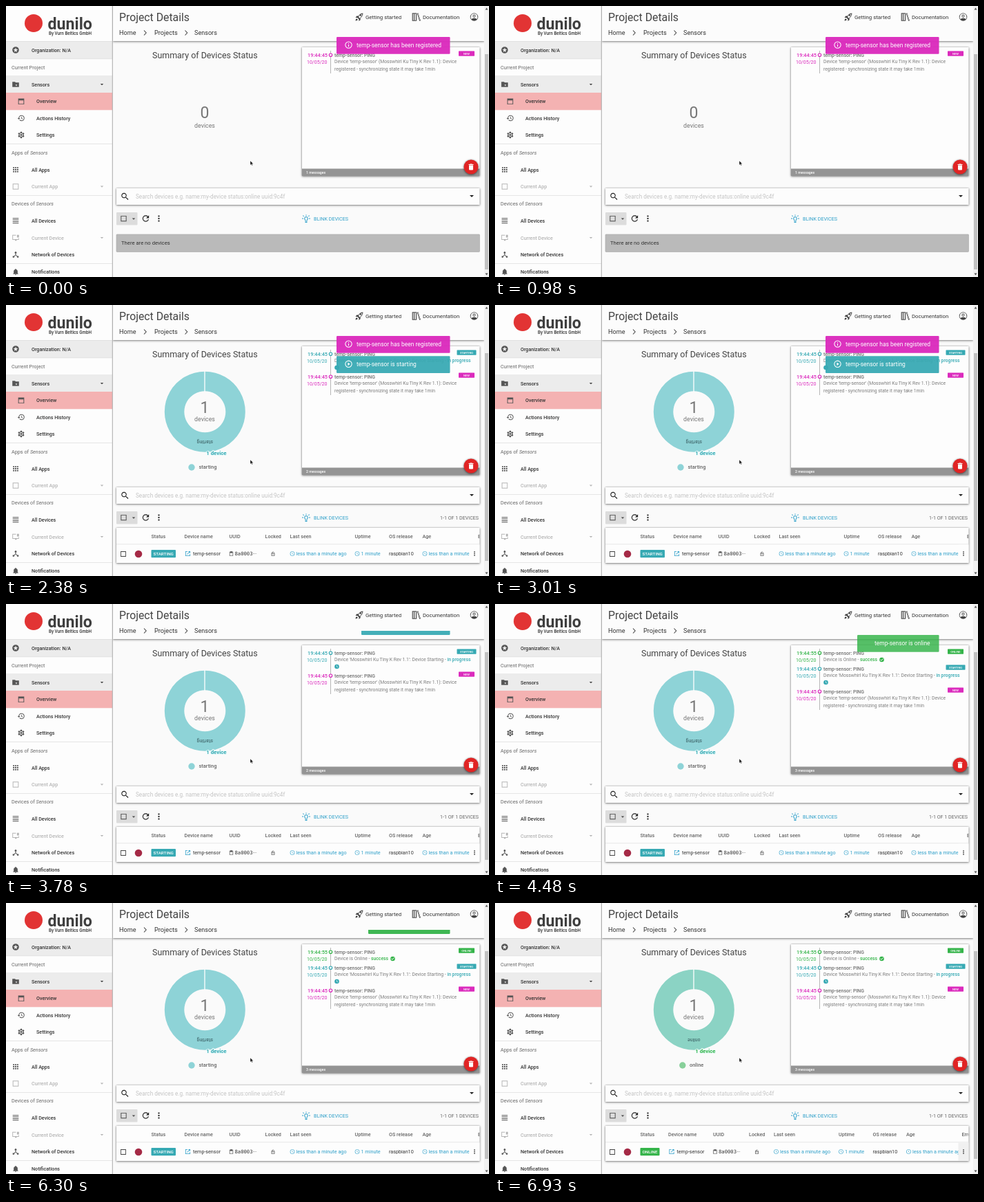
Animation of 700x394 px, one loop 7000 ms. Source, as an HTML page:

```html
<!DOCTYPE html>
<html lang="en">
<head>
<meta charset="utf-8">
<title>Project Details</title>
<style>
html, body { margin: 0; width: 100%; height: 100%; overflow: hidden; background: #fafafa; }
svg { display: block; width: 100vw; height: 100vh; font-family: Roboto, sans-serif; }
.m { font-weight: 500; }
.b { font-weight: 700; }
.shadow { filter: drop-shadow(0 0 .8px rgba(0, 0, 0, .3)) drop-shadow(0 1px 1.5px rgba(0, 0, 0, .4)); }
</style>
</head>
<body>
<svg id="stage" viewBox="0 0 700 394"></svg>
<script>
const LOOP = 7000;
const STARTING_AT = 1190, FIRST_TOAST_OUT = 3010, SECOND_TOAST_OUT = 3640;
const ONLINE_LOG_AT = 4340, ONLINE_TOAST_OUT = 6160, ONLINE_AT = 6720;
const TEAL = '#36a9b3', MAGENTA = '#db2bbd', GREEN = '#35b44a', BLUE = '#2d9fc9';

const PATHS = {
  star: 'M12 2a10 10 0 1 0 0 20 10 10 0 0 0 0-20zm4.24 16L12 15.45 7.77 18l1.12-4.81-3.73-3.23 4.92-.42L12 5l1.92 4.53 4.92.42-3.73 3.23z',
  folder: 'M10 4H2v16h20V6H12zm6 13-2-1.5-2 1.5.8-2.4-2-1.5h2.4L14 11l.8 2.1h2.4l-2 1.5z',
  win: 'M3 3v18h18V3zm2 6h14v10H5z',
  history: 'M13 3a9 9 0 0 0-9 9H1l4 4 4-4H6a7 7 0 1 1 2.05 4.95l-1.42 1.42A9 9 0 1 0 13 3zm-1 5v5l4.3 2.5.7-1.2-3.5-2.1V8z',
  apps: 'M4 8h4V4H4zm6 12h4v-4h-4zm-6 0h4v-4H4zm0-6h4v-4H4zm6 0h4v-4h-4zm6-10v4h4V4zm-6 4h4V4h-4zm6 6h4v-4h-4zm0 6h4v-4h-4z',
  list: 'M3 4h18v2H3zm0 5h18v2H3zm0 5h18v2H3zm0 5h18v2H3z',
  box: 'M3 3v18h18V3zm2 2h14v14H5z',
  screen: 'M2 3v15h8v3h5v-3h7v-5h-2v3H4V5h9V3zm14 0h6v8h-6z',
  hub: 'M17 16l-4-4V8.82a3 3 0 1 0-2 0V12l-4 4H3v5h5v-3l4-4.2 4 4.2v3h5v-5z',
  bell: 'M12 22a2 2 0 0 0 2-2h-4a2 2 0 0 0 2 2zm6-6v-5c0-3-1.6-5.6-4.5-6.3V4a1.5 1.5 0 0 0-3 0v.7C7.6 5.4 6 8 6 11v5l-2 2v1h16v-1z',
  gear: 'M10 2h4l.6 3 2 1.1 2.9-1 2 3.5-2.3 2v2.6l2.3 2-2 3.5-2.9-1-2 1.1-.6 3h-4l-.6-3-2-1.1-2.9 1-2-3.5 2.3-2v-2.6l-2.3-2 2-3.5 2.9 1 2-1.1zm2 5a5 5 0 1 0 0 10 5 5 0 0 0 0-10zm0 2a3 3 0 1 1 0 6 3 3 0 0 1 0-6z',
  caret: 'M6 9l6 6 6-6z',
  search: 'M15.5 14h-.8l-.3-.3a6.5 6.5 0 1 0-.7.7l.3.3v.8l5 5 1.5-1.5zm-6 0a4.5 4.5 0 1 1 0-9 4.5 4.5 0 0 1 0 9z',
  refresh: 'M17.65 6.35A8 8 0 1 0 19.73 14h-2.08A6 6 0 1 1 12 6c1.66 0 3.14.69 4.22 1.78L13 11h7V4z',
  dots: 'M10 3h4v4h-4zm0 7h4v4h-4zm0 7h4v4h-4z',
  trash: 'M6 19a2 2 0 0 0 2 2h8a2 2 0 0 0 2-2V7H6zM19 4h-3.5l-1-1h-5l-1 1H5v2h14z',
  clock: 'M12 2a10 10 0 1 0 0 20 10 10 0 0 0 0-20zm0 2a8 8 0 1 1 0 16 8 8 0 0 1 0-16zm-1 3v6l5 3 .8-1.3-4.2-2.5V7z',
  solidClock: 'M12 2a10 10 0 1 0 0 20 10 10 0 0 0 0-20zm-1 4h2v6l4 3-1 1.6-5-3.6z',
  check: 'M12 2a10 10 0 1 0 0 20 10 10 0 0 0 0-20zm-2 15-5-5 1.4-1.4L10 14.2l7.6-7.6L19 8z',
  info: 'M12 2a10 10 0 1 0 0 20 10 10 0 0 0 0-20zm0 2a8 8 0 1 1 0 16 8 8 0 0 1 0-16zm-1 3h2v2h-2zm0 4h2v6h-2z',
  play: 'M12 2a10 10 0 1 0 0 20 10 10 0 0 0 0-20zm0 2a8 8 0 1 1 0 16 8 8 0 0 1 0-16zm-2 3.5v9l6-4.5z',
  user: 'M12 2a10 10 0 1 0 0 20 10 10 0 0 0 0-20zm0 1.5a8.5 8.5 0 0 1 6.5 14c-3-3.2-10-3.2-13 0A8.5 8.5 0 0 1 12 3.5zM12 6a3.6 3.6 0 1 0 0 7.2A3.6 3.6 0 0 0 12 6zm0 1.5a2.1 2.1 0 1 1 0 4.2 2.1 2.1 0 0 1 0-4.2z',
  open: 'M3 3v18h18v-8h-2v6H5V5h6V3zm11 0v2h3.6l-9 9 1.4 1.4 9-9V10h2V3z',
  clip: 'M4 4v18h16V4h-4V2H8v2zm2 2h2v3h8V6h2v14H6z',
  lock: 'M5 9v13h14V9h-9V6a2.5 2.5 0 0 1 5 0h2A5 5 0 0 0 8 6v3zm2 2h10v9H7zm4 3h2v3h-2z',
  rocket: 'M22 2c-6 0-9 3-12 7H5l-3 5h5l4 4v5l4-3v-5c4-3 7-7 7-13zm-2 2c0 4-2 7-7 11l-3-3c3-5 6-7 10-8zm-4 2a2 2 0 1 0 0 4 2 2 0 0 0 0-4zM5 16c-2 1-3 3-3 6 3 0 5-1 6-3z',
  books: 'M2 2v20h11V2zm2 2h2v16H4zm4 0h3v16H8zm6-1 6 19 3-1-6-19zm2 1 1-.3 4.6 15.4-1 .3z',
  bulb: 'M12 5a6 6 0 0 0-3 11v4h6v-4a6 6 0 0 0-3-11zm0 2a4 4 0 0 1 1.5 7.5V18h-3v-3.5A4 4 0 0 1 12 7zM11 0h2v3h-2zM2 3l1.5-1.5 2.5 2.5-1.5 1.5zm18.5-1.5L22 3l-2.5 2.5L18 4zM0 10h4v2H0zm20 0h4v2h-4zM9 21h6v2H9z'
};

const text = (s, x, y, size, fill = '#333', attrs = '') =>
  `<text x="${x}" y="${y}" font-size="${size}" fill="${fill}" ${attrs}>${s}</text>`;
const rect = (x, y, w, h, fill, attrs = '') =>
  `<rect x="${x}" y="${y}" width="${w}" height="${h}" fill="${fill}" ${attrs}/>`;
const disc = (x, y, r, fill, attrs = '') =>
  `<circle cx="${x}" cy="${y}" r="${r}" fill="${fill}" ${attrs}/>`;
const icon = (name, x, y, size = 11, fill = '#444') =>
  `<path d="${PATHS[name]}" fill="${fill}" fill-rule="evenodd" transform="translate(${x - size / 2} ${y - size / 2}) scale(${size / 24})"/>`;
const M = 'class="m"', MID = 'text-anchor="middle"', END = 'text-anchor="end"';

function sidebar() {
  const row = (name, label, y, indent, fill = '#333') =>
    icon(name, indent ? 22 : 14, y, 11.5, fill === '#333' ? '#555' : fill) +
    text(label, indent ? 44 : 37, y + 2.6, 7.15, fill, M);
  const heading = (label, y) => text(label, 8, y + 2.6, 7.25, '#666');
  const line = y => rect(0, y, 154, .7, '#ddd');
  const dim = '#b5b5b5';
  return rect(0, 0, 154, 394, '#fdfdfd') +
    disc(40, 25, 13, '#e23434') +
    text('dunilo', 60.5, 33.5, 23.2, '#3f3f3f', 'class="b"') +
    text('By Vurn Beltics GmbH', 62, 41.5, 6.3, '#333', M) +
    rect(0, 51, 154, 26, '#ececec') + line(51) + line(76.5) +
    row('star', 'Organization: N/A', 64) + heading('Current Project', 89) +
    rect(0, 101, 154, 25, '#ececec') +
    row('folder', 'Sensors', 114) + icon('caret', 139, 114, 9) +
    rect(0, 126, 154, 25.3, '#f4b2b2') +
    row('win', 'Overview', 138.8, 1) + row('history', 'Actions History', 163, 1) + row('gear', 'Settings', 187.5, 1) +
    line(200) + heading('Apps of <tspan font-style="italic">Sensors</tspan>', 213) +
    row('apps', 'All Apps', 238) + row('box', 'Current App', 262.5, 0, dim) + icon('caret', 139, 262.5, 9, dim) +
    line(275) + heading('Devices of <tspan font-style="italic">Sensors</tspan>', 287.5) +
    row('list', 'All Devices', 312) + row('screen', 'Current Device', 337, 0, dim) + icon('caret', 139, 337, 9, dim) +
    row('hub', 'Network of Devices', 361.5) + line(374) + row('bell', 'Notifications', 386.5) +
    rect(153.8, 0, 1, 394, '#aaa');
}

function header() {
  const chevron = x => `<path d="M${x} 35.5l3.2 3.5-3.2 3.5" fill="none" stroke="#444" stroke-width="1.1"/>`;
  return rect(155, 0, 538, 51, '#fcfcfc', 'class="shadow"') +
    text('Project Details', 164, 21.5, 15.8, '#444') +
    text('Home', 164, 42, 9.1) + chevron(200) + text('Projects', 215, 42, 9.2) + chevron(259.5) + text('Sensors', 273, 42, 9.1) +
    icon('rocket', 512, 16, 13) + text('Getting started', 521, 19, 7.85) +
    icon('books', 594.5, 16, 14) + text('Documentation', 604, 19, 7.8) + icon('user', 678.5, 16, 14);
}

function logEntry({ y, color, time, badge, lines, extra = '', wide }) {
  return `<g transform="translate(0 ${y})">` +
    text(time, 466, 2.7, 7.35, color, `${M} ${END}`) + text('10/05/20', 465.5, 12.7, 7.05, color, END) +
    disc(470.5, .2, 2.2, '#fff', `stroke="${color}" stroke-width="1.2"`) +
    text('temp-sensor: PING', 476, 2.5, 6.95, '#707070', M) +
    lines.map((s, i) => text(s, 476, 12.4 + i * 10.5, 6.8, '#7c7c7c')).join('') +
    rect(667.5 - wide / 2, -5.6, wide, 7.3, color, 'rx=".6"') +
    text(badge, 667.5, -.4, 4.1, '#fff', `${M} ${MID}`) + extra + '</g>';
}

function log(count) {
  const registered = {
    color: MAGENTA, time: '19:44:45', badge: 'NEW', wide: 23,
    lines: ["Device 'temp-sensor' (Mosswhirl Ku Tiny K Rev 1.1): Device", 'registered - synchronizing state it may take 1min']
  };
  const starting = {
    color: TEAL, time: '19:44:45', badge: 'STARTING', wide: 28,
    lines: [`Device 'Mosswhirl Ku Tiny K Rev 1.1': Device Starting - <tspan fill="${TEAL}" class="m">in progress</tspan>`],
    extra: icon('solidClock', 479.5, 20, 8, TEAL)
  };
  const online = {
    color: GREEN, time: '19:44:55', badge: 'ONLINE', wide: 23,
    lines: [`Device is Online - <tspan fill="${GREEN}" class="m">success</tspan>`],
    extra: icon('check', 560.5, 10, 8, GREEN)
  };
  const entries = [registered, starting, online].slice(0, count).reverse();
  const tops = [[71], [71, 104], [71, 94, 127]][count - 1];
  return rect(470.2, 65, .7, tops[count - 1] - 38, '#999') +
    entries.map((e, i) => logEntry({ ...e, y: tops[i] })).join('') +
    text(count + ' messages', 435, 243.5, 5.2, '#fff', M);
}

function table(online) {
  const shift = online ? -7.5 : 0, color = online ? GREEN : TEAL;
  const cols = { 'Device name': 258.5, UUID: 323.5, Locked: 375.5, 'Last seen': 411.5, Uptime: 505.5, 'OS release': 555, Age: 603.5, Errors: 684 };
  const ago = (s, x) => icon('clock', x + 3.5, 361.5, 8, BLUE) + text(s, x + 9, 363.8, 7.25, BLUE);
  return rect(160, 324, 526.5, 51, '#fdfdfd', 'class="shadow"') + rect(160, 347.5, 526.5, .7, '#ddd') +
    icon('box', 170, 362, 10.5) + disc(192, 362, 5.3, '#a52a46') +
    text('Status', 210.5, 339, 7.2, '#666', M) +
    rect(210.5, 356, online ? 28 : 35.5, 11.2, color, 'rx="1"') +
    text(online ? 'ONLINE' : 'STARTING', online ? 224.5 : 228.2, 363.8, 6.25, '#fff', `${M} ${MID}`) +
    `<g clip-path="url(#tableClip)"><g transform="translate(${shift} 0)">` +
    Object.entries(cols).map(([s, x]) => text(s, x, 339, 7.2, '#666', M)).join('') +
    icon('open', 263.5, 361.5, 9.5, BLUE) + text('temp-sensor', 271, 363.5, 7.15) +
    icon('clip', 326.5, 361.5, 8) +
    text('8a0003<tspan font-family="Roboto, sans-serif">···</tspan>', 331.5, 364, 7.2, '#333', 'font-family="DejaVu Sans Mono, monospace"') +
    icon('lock', 387, 361.5, 8, '#333') +
    ago('less than a minute ago', 411.5) + ago('1 minute', 505.5) +
    text('raspbian10', 555, 363.8, 7.2) +
    ago('less than a minute ago', 603.5) + '</g></g>' +
    rect(671.5, 348.5, 15, 26, online ? '#f0f0f0' : '#fdfdfd') + icon('dots', 679, 361.5, 8.5, '#222') +
    text('1-1 OF 1 DEVICES', 685, 311.8, 7.1, '#666', END);
}

const toast = (id, x, color, label, glyph) =>
  `<g id="${id}">${rect(x, 45, 643.5 - x, 24.7, color, 'rx="1.2"')}` +
  (glyph ? icon(glyph, 496.5, 56.6, 12.5, '#fff') : '') +
  text(label, glyph ? 508 : 550, 59.6, 8.45, '#fff') + '</g>';

const stage = document.getElementById('stage');
stage.innerHTML =
  `<defs><clipPath id="tableClip"><rect x="160" y="324" width="526.5" height="51"/></clipPath>
   <clipPath id="toastClip"><rect x="440" y="39" width="250" height="90"/></clipPath></defs>` +
  rect(0, 0, 700, 394, '#fafafa') + header() + sidebar() +
  text('Summary of Devices Status', 288.3, 76, 12.45, '#444', MID) +
  '<path id="ring"/><g id="center"></g><path id="seam" d="M288 96V126" stroke="#fff" stroke-width="1.3"/>' +
  `<text id="slice" ${MID} font-size="6.8" fill="#36585c"></text>` +
  '<text id="tag" class="b" font-size="7.8" stroke="#eafafa" stroke-width="2" paint-order="stroke">1 device</text>' +
  '<g id="legend"></g>' +
  rect(429, 60, 257.5, 187, '#fdfdfd', 'class="shadow"') + rect(429, 236.5, 257.5, 10.5, '#949494') +
  '<g id="log"></g>' + disc(674, 234, 10.5, '#e02424', 'class="shadow"') + icon('trash', 674, 234, 12, '#fff') +
  rect(160, 265, 526.5, 24, '#fdfdfd', 'class="shadow"') + icon('search', 172.5, 277, 14, '#222') +
  text('Search devices e.g. name:my-device status:online uuid:9c4f', 188, 279.5, 8.2, '#c4c4c4') + icon('caret', 675, 276.5, 12, '#222') +
  rect(160, 300, 30.5, 18.5, '#dcdcdc', 'rx="1"') + icon('box', 170.5, 309, 11) + icon('caret', 185, 309.5, 9) +
  icon('refresh', 202.5, 309, 14, '#222') + icon('dots', 221.5, 309, 12, '#222') +
  icon('bulb', 435, 309.5, 12, BLUE) + text('BLINK DEVICES', 446, 311.8, 7.2, BLUE) +
  '<g id="devices"></g><g clip-path="url(#toastClip)">' +
  toast('toastRegistered', 479, MAGENTA, 'temp-sensor has been registered', 'info') +
  toast('toastStarting', 479, TEAL, 'temp-sensor is starting', 'play') +
  toast('toastOnline', 525, GREEN, 'temp-sensor is online') + '</g>' +
  rect(693, 0, 7, 394, '#f1f1f1') + '<rect id="thumb" x="694" y="70" width="5" fill="#c1c1c1"/>' +
  '<path d="M694.5 5.5l2-3 2 3zM694.5 388.5l2 3 2-3z" fill="#555"/>' +
  '<path d="M354 225v6.3l1.5-1.4 1 2.2 1-.5-1-2.1h2z" fill="#111" stroke="#fff" stroke-width=".4"/>';

const $ = id => document.getElementById(id);
const clamp = v => Math.max(0, Math.min(1, v));
const span = (t, start, length) => clamp((t - start) / length);
const mix = (a, b, p) => `rgb(${a.map((v, i) => Math.round(v + (b[i] - v) * p))})`;
const set = (id, attrs) => { for (const k in attrs) $(id).setAttribute(k, attrs[k]); };
const show = (id, on) => set(id, { visibility: on ? 'visible' : 'hidden' });

// Markup is rebuilt only when its state key changes.
const cache = {};
function fill(id, key, build) {
  if (cache[id] === key) return;
  cache[id] = key;
  $(id).innerHTML = build();
}

function ringPath(cx, cy, outer, inner, turn) {
  const a = Math.min(turn, .9999) * 2 * Math.PI, big = turn > .5 ? 1 : 0;
  const at = r => `${cx + r * Math.sin(a)} ${cy - r * Math.cos(a)}`;
  return `M${cx} ${cy - outer}A${outer} ${outer} 0 ${big} 1 ${at(outer)}L${at(inner)}A${inner} ${inner} 0 ${big} 0 ${cx} ${cy - inner}z`;
}

function drawChart(t) {
  const active = t >= STARTING_AT, online = t >= ONLINE_AT;
  const turn = 1 - (1 - span(t, 1260, 1200)) ** 4;
  const stretch = Math.min(1, (1 - turn) / .34);
  const cx = 288.3, cy = 155.2 + 2 * stretch, outer = 58.5 + 2.3 * stretch, inner = 30 + stretch;
  const angle = turn * Math.PI, mid = (outer + inner) / 2;
  const sx = cx + mid * Math.sin(angle), sy = cy - mid * Math.cos(angle);
  const tint = span(t, ONLINE_AT, 700);
  ['ring', 'slice', 'tag', 'legend'].forEach(id => show(id, active && turn > 0));
  show('seam', turn > .99);
  set('ring', { d: ringPath(cx, cy, outer, inner, turn), fill: mix([142, 211, 215], [133, 210, 153], tint) });
  set('slice', { transform: `translate(${sx} ${sy}) rotate(${turn * 180})`, y: 2 });
  set('tag', {
    x: cx + (outer + 2) * Math.sin(angle) + 2, y: cy - (outer + 2) * Math.cos(angle) + 2.3,
    fill: online ? GREEN : TEAL
  });
  $('slice').textContent = online ? 'online' : 'starting';
  fill('center', active, () =>
    text(active ? 1 : 0, 288, active ? 157.3 : 163, 23, '#777', MID) +
    text('devices', 288, active ? 169.2 : 176.8, 8.8, '#777', MID));
  fill('legend', online, () =>
    disc(online ? 271.8 : 269, 236, 4.7, online ? '#88d09a' : '#8ed3d7') +
    text(online ? 'online' : 'starting', online ? 282 : 279.5, 238.3, 7.45, '#666', M));
}

function drawToasts(t) {
  const lift = start => -31 * span(t, start, 175);
  const narrow = t >= FIRST_TOAST_OUT + 175;
  const drop = 29.2 * (1 - span(t, FIRST_TOAST_OUT, 175));
  const place = (id, from, start, dy, opacity) => {
    show(id, t >= from && t < start + 175);
    set(id, { transform: `translate(0 ${dy})`, opacity });
  };
  place('toastRegistered', 0, FIRST_TOAST_OUT, lift(FIRST_TOAST_OUT), .96);
  place('toastStarting', STARTING_AT, SECOND_TOAST_OUT, drop + lift(SECOND_TOAST_OUT), .93 * span(t, STARTING_AT - 70, 280));
  place('toastOnline', ONLINE_LOG_AT, ONLINE_TOAST_OUT, lift(ONLINE_TOAST_OUT), .95 * span(t, ONLINE_LOG_AT - 70, 240));
  const [box, glyph, label] = $('toastStarting').children, left = narrow ? 515 : 479;
  box.setAttribute('x', left);
  box.setAttribute('width', 643.5 - left);
  glyph.setAttribute('transform', `translate(${left + 11.25} 50.35) scale(.52)`);
  label.setAttribute('x', left + 29);
}

function render(t) {
  const messages = t < STARTING_AT ? 1 : t < ONLINE_LOG_AT ? 2 : 3;
  fill('log', messages, () => log(messages));
  const state = t < STARTING_AT ? 'none' : t < ONLINE_AT ? 'starting' : 'online';
  fill('devices', state, () => state === 'none'
    ? rect(160, 332, 526.5, 25.5, '#bababa', 'rx="1" stroke="#a8a8a8" stroke-width=".6"') + text('There are no devices', 167, 347.3, 7.7)
    : table(state === 'online'));
  set('thumb', { height: state === 'none' ? 313 : 302 });
  drawChart(t);
  drawToasts(t);
}

const began = performance.now();
function tick() {
  const t = (performance.now() - began) % LOOP;
  render(Math.floor(t / 70) * 70);
  requestAnimationFrame(tick);
}
tick();
</script>
</body>
</html>
```
